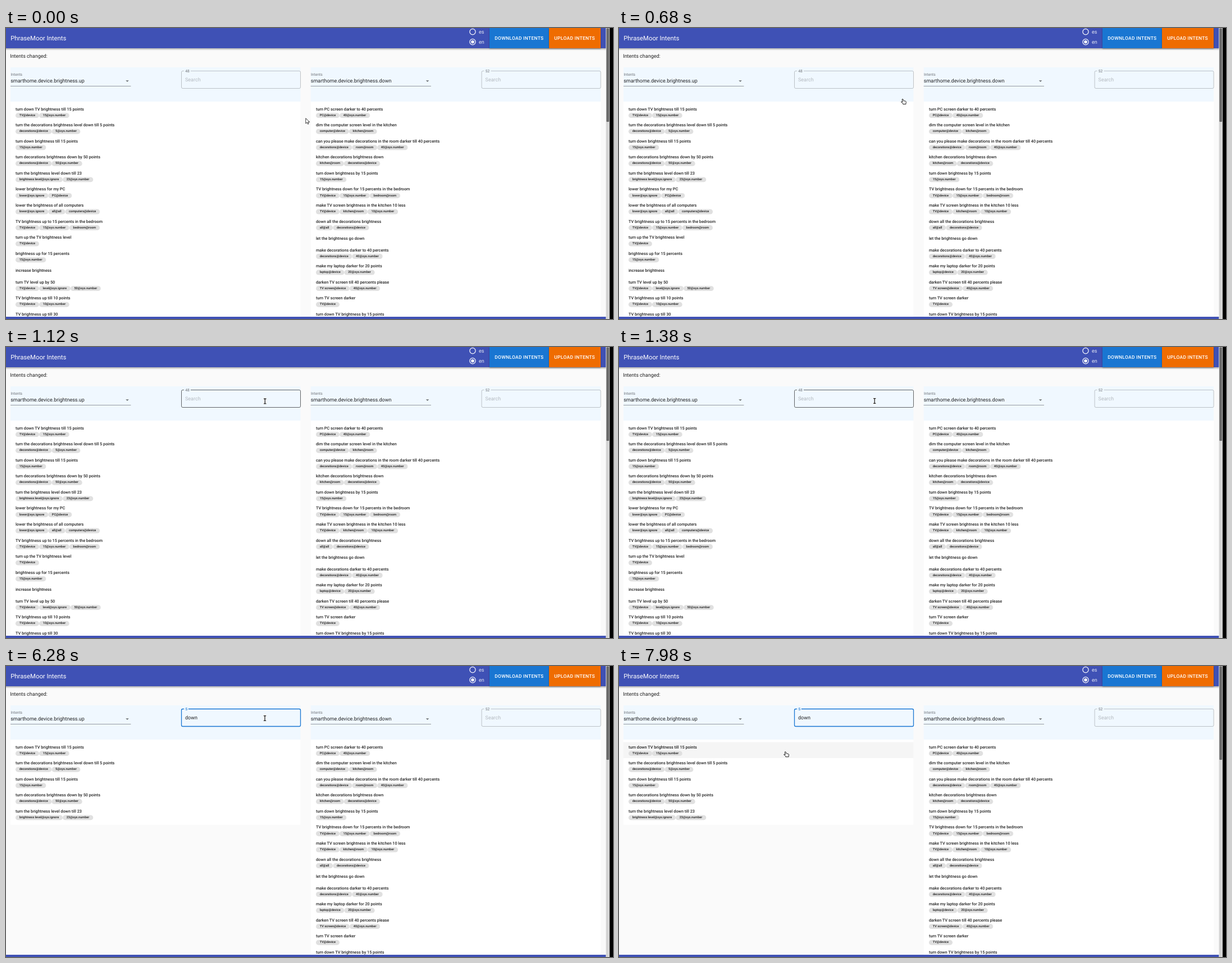
These frames come from a looping animation (1081x518 px, 8000 ms). An HTML page:

```html
<!DOCTYPE html>
<html lang="en">
<head>
<meta charset="utf-8">
<title>Intents</title>
<style>
html, body { margin: 0; width: 100%; height: 100%; overflow: hidden; background: #fafafa; }
body { position: relative; font-family: Roboto, Arial, sans-serif; text-rendering: geometricPrecision; }
svg { position: absolute; left: 0; top: 0; font-family: Roboto, Arial, sans-serif; }
.list { position: absolute; top: 131.2px; width: 922px; padding: 8px 0; background: #fff;
  transform: scale(.56); transform-origin: 0 0; color: rgba(0,0,0,.87); white-space: nowrap; }
.row { height: 51px; padding-left: 16px; font: 500 13px/34px Roboto, Arial, sans-serif; }
.row.bare { height: 40px; line-height: 40px; }
.row.hover { background: #f5f5f5; }
.chips { display: flex; margin-top: -6.4px; }
.chips span { padding: 0 12px; border-radius: 8px; background: #e0e0e0; font-size: 10px; line-height: 16px; }
.raised { filter: drop-shadow(0 1px 1.3px rgba(0,0,0,.35)); }
</style>
</head>
<body>
<div class="list" id="left" style="left:8px"></div>
<div class="list" id="right" style="left:542.6px"></div>
<svg id="ui" width="1081" height="518" viewBox="0 0 1081 518"></svg>
<script>
const $ = id => document.getElementById(id);

// phrase | chips, where # stands for @sys.number, ! for @sys.ignore, $ for @device
const phrases = {
  left: `turn down TV brightness till 15 points|TV$ 15#
turn the decorations brightness level down till 5 points|decorations$ 5#
turn down brightness till 15 points|15#
turn decorations brightness down by 50 points|decorations$ 50#
turn the brightness level down till 23|brightness_level! 23#
lower brightness for my PC|lower! PC$
lower the brightness of all computers|lower! all@all computers$
TV brightness up to 15 percents in the bedroom|TV$ 15# bedroom@room
turn up the TV brightness level|TV$
brightness up for 15 percents|15#
increase brightness
turn TV level up by 50|TV$ level! 50#
TV brightness up till 10 points|TV$ 10#
TV brightness up till 30|TV$ 30#`,
  right: `turn PC screen darker to 40 percents|PC$ 40#
dim the computer screen level in the kitchen|computer$ kitchen@room
can you please make decorations in the room darker till 40 percents|decorations$ room@room 40#
kitchen decorations brightness down|kitchen@room decorations$
turn down brightness by 15 points|15#
TV brightness down for 15 percents in the bedroom|TV$ 15# bedroom@room
make TV screen brightness in the kitchen 10 less|TV$ kitchen@room 10#
down all the decorations brightness|all@all decorations$
let the brightness go down
make decorations darker to 40 percents|decorations$ 40#
make my laptop darker for 20 points|laptop$ 20#
darken TV screen till 40 percents please|TV_screen$ 40#
turn TV screen darker|TV$
turn down TV brightness by 15 points|TV$ 15#`
};
const suffix = { '#': '@sys.number', '!': '@sys.ignore', '$': '@device', '_': ' ' };

function row(line) {
  const [phrase, chips] = line.split('|');
  if (!chips) return `<div class="row bare">${phrase}</div>`;
  const spans = chips.split(' ').map(c => `<span>${c.replace(/[#!$_]/g, m => suffix[m])}</span>`);
  return `<div class="row">${phrase}<div class="chips">${spans.join('')}</div></div>`;
}
for (const id in phrases) $(id).innerHTML = phrases[id].split('\n').map(row).join('');
const rows = [...$('left').children];

const rect = (x, y, w, h, fill, more = '') =>
  `<rect x="${x}" y="${y}" width="${w}" height="${h}" fill="${fill}" ${more}/>`;
const text = (x, y, size, str, fill = 'rgba(0,0,0,.87)', more = '') =>
  `<text x="${x}" y="${y}" font-size="${size}" fill="${fill}" ${more}>${str}</text>`;
const radio = (y, label) =>
  `<circle cx="831" cy="${y}" r="5.1" fill="none" stroke="#fff" stroke-width="1.2"/>` +
  text(842, y + 3, 9, label, 'rgba(255,255,255,.88)');
const button = (x, w, label, fill) => rect(x, 0, w, 36, fill, 'class="raised"') +
  text(x + 9.3, 20.9, 8.5, label, '#fff', 'font-weight="500" letter-spacing=".27"');

const grey = 'rgba(0,0,0,.54)', faint = 'rgba(0,0,0,.25)', edge = 'rgba(0,0,0,.22)';

function panel(x, intent, count, id) {
  return rect(x, 70, 516.4, 61, '#f0f8ff') +
    text(x + .4, 85.4, 6.72, 'Intents', grey) +
    text(x + .2, 97.3, 9, intent) +
    rect(x, 103, 214.4, .9, 'rgba(0,0,0,.42)') +
    `<path d="M${x + 205.2} 93.2h5.6l-2.8 2.8z" fill="${grey}"/>` +
    rect(x + 304.5, 76.5, 212, 31, 'none', `id="${id}Box" rx="2.2" stroke="${edge}"`) +
    rect(x + 308.9, 75.4, 12, 2.2, '#f0f8ff', `id="${id}Notch"`) +
    text(x + 311.2, 79.4, 6.72, count, grey, `id="${id}Count"`) +
    text(x + 311, 95.2, 9, 'Search', faint, `id="${id}Text"`);
}

const beam = 'M-2.2-4.3H2.2M0-4.3V4.3M-2.2 4.3H2.2';
const cursors = {
  arrow: `<path d="M-3.6-5V4.3L-1.4 2.3 .2 5.5 1.8 4.7 .3 1.7H3.4Z" fill="#fff" stroke="#222" stroke-width=".9"/>`,
  hand: `<path d="M-2.8-3.9Q-1.9-5-.9-3.9L.2-1.2 3.4-.7Q4.6-.2 4.5 1L4.1 3V4.7H-1.2V3.4L-4.3 1Q-4.3-.3-3 .1L-1.6.5Z"
    fill="#fff" stroke="#222" stroke-width="1" stroke-linejoin="round"/>`,
  beam: `<path d="${beam}" stroke="#fff" stroke-width="2.4"/><path d="${beam}" stroke="#222" stroke-width="1.3"/>`
};

$('ui').innerHTML =
  `<defs><linearGradient id="shade" x2="0" y2="1"><stop stop-opacity=".3"/><stop offset="1" stop-opacity="0"/></linearGradient></defs>` +
  rect(0, 36, 1068.5, 4, 'url(#shade)') +
  rect(0, 0, 1068.5, 36, '#3f51b5') +
  text(8.2, 22, 11.3, 'PhraseMoor Intents', '#fff') +
  radio(6.8, 'es') + radio(24.8, 'en') + '<circle cx="831" cy="24.8" r="2.8" fill="#fff"/>' +
  button(861, 106, 'DOWNLOAD INTENTS', '#1976d2') +
  button(967, 92, 'UPLOAD INTENTS', '#ef6c00') +
  text(7.2, 52.6, 9, 'Intents changed:') +
  panel(8, 'smarthome.device.brightness.up', 48, 'l') +
  panel(542.6, 'smarthome.device.brightness.down', 52, 'r') +
  rect(0, 514, 1068.5, 4, '#3f51b5') +
  rect(1068.5, 0, 6.5, 518, '#d4d4d4') +
  rect(1069.3, 0.5, 4.8, 166.5, '#686868', 'rx="1"') +
  rect(1075, 0, 6, 518, '#000') +
  Object.keys(cursors).map(k => `<g id="${k}">${cursors[k]}</g>`).join('');

// pointer: a glide along these points, then single jumps
const glide = [[440, 537.4, 165.7], [680, 507, 131], [960, 467, 97], [1240, 457, 96.2], [1380, 455.2, 96]];
const jumps = [[6280, 461, 93], [6840, 450, 102], [7400, 340, 146], [7980, 298, 157]];

function pointer(t) {
  const jump = jumps.filter(j => t >= j[0]).pop();
  if (jump) return jump.slice(1);
  const i = glide.findIndex(p => t < p[0]);
  if (i < 1) return glide[i ? glide.length - 1 : 0].slice(1);
  const a = glide[i - 1], b = glide[i], k = (t - a[0]) / (b[0] - a[0]);
  return [1, 2].map(n => a[n] + (b[n] - a[n]) * k);
}

function shape(t) {
  if (t >= 7400 || (t >= 540 && t < 700)) return 'hand';
  return t < 860 ? 'arrow' : 'beam';
}

function set(id, attrs) {
  for (const k in attrs) $(id).setAttribute(k, attrs[k]);
}

function draw(now) {
  const t = now % 8000, typed = t >= 5300, hover = t >= 1000;
  set('lBox', { stroke: typed ? '#1976d2' : hover ? 'rgba(0,0,0,.6)' : edge, 'stroke-width': typed ? 1.3 : 1 });
  set('lNotch', { width: typed ? 8 : 12 });
  set('lCount', { fill: typed ? '#1976d2' : grey });
  set('lText', { fill: typed ? 'rgba(0,0,0,.87)' : faint });
  $('lCount').textContent = typed ? '5' : '48';
  $('lText').textContent = typed ? 'down' : 'Search';
  rows.forEach((r, i) => r.style.display = typed && i > 4 ? 'none' : '');
  rows[0].classList.toggle('hover', t >= 7400);

  const [x, y] = pointer(t), kind = shape(t);
  for (const k in cursors) set(k, { transform: `translate(${x} ${y})`, visibility: k === kind ? 'visible' : 'hidden' });
  requestAnimationFrame(draw);
}
draw(0);
</script>
</body>
</html>
```
